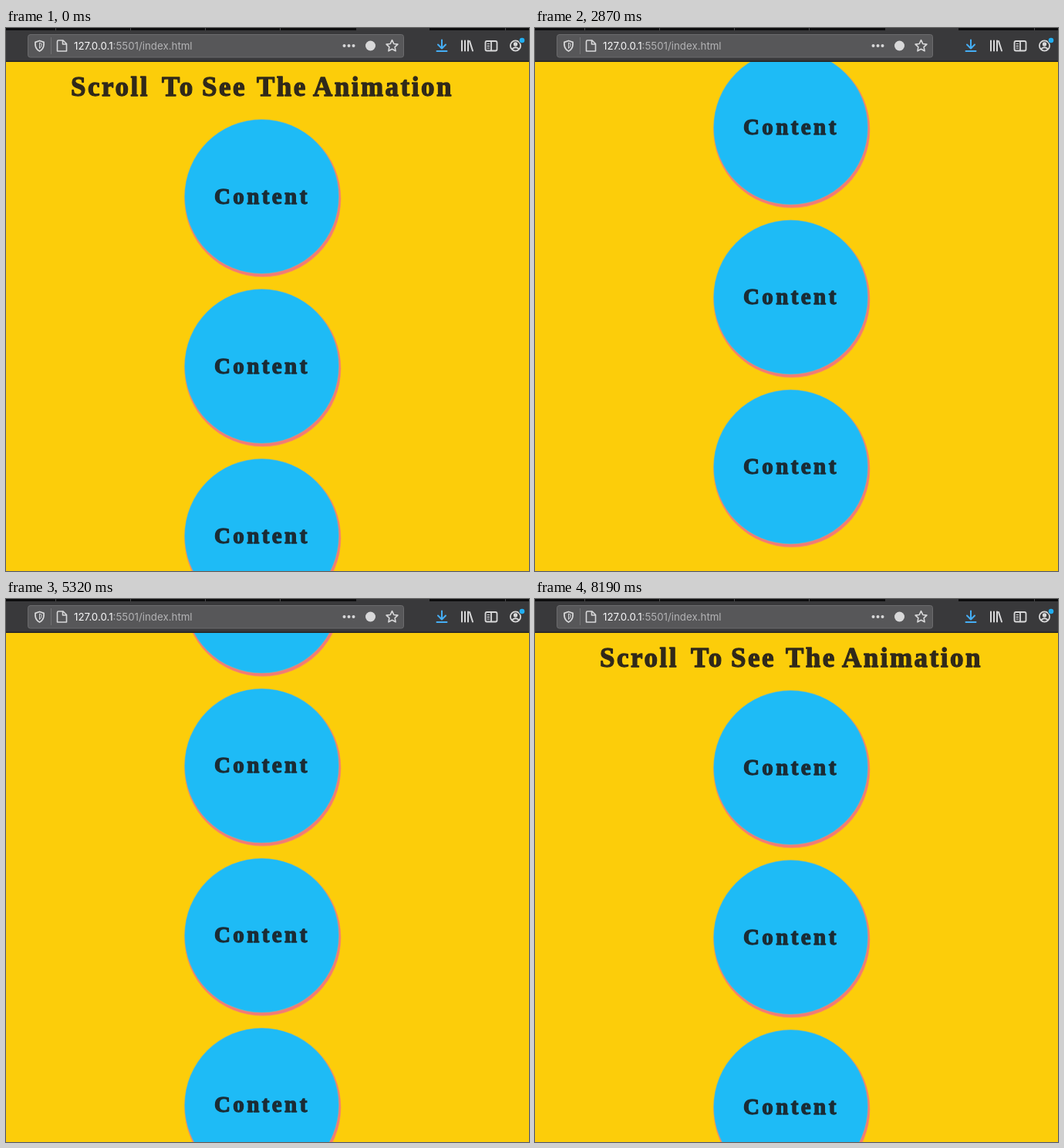
These frames come from a looping animation (678x704 px, 8.26 s). An HTML page with a canvas:

```html
<!DOCTYPE html>
<html lang="en">
<head>
<meta charset="utf-8">
<title>Scroll Animation</title>
<style>
  html, body { margin: 0; width: 100%; height: 100%; overflow: hidden; background: #fccd0a; }
  canvas { display: block; }
</style>
</head>
<body>
<canvas id="stage" width="678" height="704"></canvas>
<script>
const ctx = document.getElementById('stage').getContext('2d');
const W = 678, H = 704, LOOP = 8260, STEP = 70;
const BAR = 44, CX = 331.5, FIRST = 218.5, PITCH = 220, R = 100;
const BOXES = 12, TRIGGER = 667, SLIDE = 400, FAR = 800;
const SERIF = '"Liberation Serif", "Noto Serif", serif';

// Scroll position over time: [ms, px]
const KEYS = [
  [0, 0], [750, 0], [880, 113], [1120, 333], [1400, 480], [1700, 560],
  [2000, 790], [2400, 1000], [2870, 1189.5], [3150, 1440], [3500, 1660],
  [3968, 1873], [4090, 1925], [5020, 1925], [5400, 1700], [5700, 1410],
  [5880, 1339], [6300, 1260], [6500, 1205], [6790, 1101.5], [7100, 700],
  [7400, 190], [7580, 0], [LOOP, 0]
];
const grade = KEYS.slice(1).map((k, i) => (k[1] - KEYS[i][1]) / (k[0] - KEYS[i][0]));
const slope = KEYS.map((k, i) => {
  const a = grade[i - 1] || 0, b = grade[i] || 0;
  return a * b > 0 ? 2 * a * b / (a + b) : 0;
});

function scrollAt(t) {
  let i = 0;
  while (i < KEYS.length - 2 && t >= KEYS[i + 1][0]) i++;
  const [t0, y0] = KEYS[i], [t1, y1] = KEYS[i + 1];
  const d = t1 - t0, u = (t - t0) / d, v = 1 - u;
  return y0 * (1 + 2 * u) * v * v + slope[i] * d * u * v * v
       + y1 * u * u * (3 - 2 * u) - slope[i + 1] * d * u * u * v;
}

// CSS "ease": cubic-bezier(.25, .1, .25, 1)
function ease(x) {
  if (x <= 0) return 0;
  if (x >= 1) return 1;
  let lo = 0, hi = 1, s = 0.5;
  for (let i = 0; i < 20; i++) {
    s = (lo + hi) / 2;
    const bx = 0.75 * s * (1 - s) + s * s * s;
    if (bx < x) lo = s; else hi = s;
  }
  return 0.3 * s * (1 - s) * (1 - s) + 3 * s * s * (1 - s) + s * s * s;
}

// When each box enters and leaves the trigger zone
const boxes = Array.from({ length: BOXES }, (_, i) => {
  const need = FIRST - R + PITCH * i - TRIGGER;
  if (need < 0) return { enter: -SLIDE, leave: LOOP };
  let enter = 0, leave = LOOP;
  while (scrollAt(enter) < need) enter += 5;
  while (scrollAt(leave) < need) leave -= 5;
  return { enter, leave };
});

function disc(x, y, r, fill) {
  ctx.beginPath();
  ctx.arc(x, y, r, 0, 7);
  ctx.fillStyle = fill;
  ctx.fill();
}

function rect(x, y, w, h, fill) {
  ctx.fillStyle = fill;
  ctx.fillRect(x, y, w, h);
}

function line(path, color = '#d8d8d9', width = 1.8) {
  ctx.strokeStyle = color;
  ctx.lineWidth = width;
  ctx.stroke(new Path2D(path));
}

function fatText(text, x, y, size, gap, color) {
  ctx.font = `bold ${size}px ${SERIF}`;
  ctx.letterSpacing = gap + 'px';
  ctx.fillStyle = ctx.strokeStyle = color;
  ctx.lineWidth = 1.3;
  ctx.fillText(text, x, y);
  ctx.strokeText(text, x, y);
  ctx.letterSpacing = '0px';
}

function drawBox(x, y) {
  disc(x + 1.3, y + 3, 101.6, '#fb9f48');
  disc(x + 1.2, y + 2.7, 101, '#f27b75');
  disc(x, y, 100.2, '#73b9b5');
  disc(x, y, 99.5, '#1ebbf6');
  fatText('Content', x - 61.5, y + 9, 29, 3.4, '#1b2c35');
}

function drawPage(t) {
  const s = scrollAt(t);
  rect(0, BAR, W, H - BAR, '#fccd0a');
  const title = [['Scroll', 84], ['To', 202], ['See', 254], ['The', 325], ['Animation', 398]];
  if (s < 60) title.forEach(([word, x]) => fatText(word, x, 88 - s, 35, 2.5, '#30291a'));
  boxes.forEach((b, i) => {
    const y = FIRST + PITCH * i - s;
    if (y < BAR - 110 || y > H + 110) return;
    const shown = ease((t - b.enter) / SLIDE) - ease((t - b.leave) / SLIDE);
    const side = i % 2 ? -1 : 1;
    drawBox(CX + side * FAR * (1 - shown), y);
  });
}

function drawBar() {
  rect(0, 0, W, BAR, '#39393b');
  rect(0, 0, W, 3, '#0d0d0e');
  [64, 161, 258, 355, 647].forEach(x => rect(x, 0, 1, 3, '#4a4a4c'));
  rect(454, 0, 95, 3, '#39393b');
  rect(0, 42.5, W, 1.5, '#252524');

  ctx.beginPath();
  ctx.roundRect(28.5, 8.5, 487, 29.5, 3);
  ctx.fillStyle = '#575759';
  ctx.fill();
  ctx.strokeStyle = '#6b6b6d';
  ctx.lineWidth = 1;
  ctx.stroke();
  rect(58, 12, 1, 22, '#717173');

  ctx.font = '13.3px Inter, Roboto, sans-serif';
  ctx.fillStyle = '#f7f7f8';
  ctx.fillText('127.0.0.1', 88, 28);
  ctx.fillStyle = '#b3b3b5';
  ctx.fillText(':5501/index.html', 88 + ctx.measureText('127.0.0.1').width, 28);

  ctx.lineCap = ctx.lineJoin = 'round';
  // shield, page
  line('M43.5 16.5 L49 18.3 V22 Q48.500 27.500 43.500 30 Q38.500 27.500 38 22 V18.300 Z');
  line('M43.500 19.500 V26.500 Q46.200 24.500 46.200 21 Z', '#d8d8d9', 1);
  line('M68 16 H74 L78.500 20.500 V30 H66.500 V17.500 Q66.500 16 68 16 M73.500 16.500 V21 H78', '#d8d8d9', 1.6);
  // menu dots, saved item, star
  [438.5, 444.5, 450.5].forEach(x => disc(x, 23, 2, '#d8d8d9'));
  disc(472.5, 23, 6.5, '#d8d8d9');
  let star = '';
  for (let i = 0; i < 10; i++) {
    const a = Math.PI * (i / 5 - 0.5), r = i % 2 ? 3.8 : 7.8;
    star += `${i ? 'L' : 'M'}${500.5 + r * Math.cos(a)} ${23.5 + r * Math.sin(a)}`;
  }
  line(star + 'Z', '#d8d8d9', 1.6);
  // download, library, sidebar
  line('M565 15.500 V26 M560 21.500 L565 26.500 L570 21.500 M558.500 30 H571.500', '#45aef5', 2);
  line('M591 16.500 V29.500 M595 16.500 V29.500 M599 16.500 V29.500 M601 17 L605 29.500', '#d8d8d9', 2);
  line('M623.500 17 H634.500 Q636.500 17 636.500 19 V27.500 Q636.500 29.500 634.500 29.500 H623.500 Q621.500 29.500 621.500 27.500 V19 Q621.500 17 623.500 17 M629 17 V29.500');
  line('M624 20.500 H626.500 M624 23.300 H626.500 M624 26 H626.500', '#d8d8d9', 1.2);
  // account
  ctx.beginPath();
  ctx.arc(660.5, 23, 6.6, 0, 7);
  ctx.strokeStyle = '#d8d8d9';
  ctx.lineWidth = 1.8;
  ctx.stroke();
  disc(660.5, 21, 2.7, '#d8d8d9');
  line('M656.500 27 Q660.500 23.500 664.500 27', '#d8d8d9', 2);
  disc(669, 16, 4.3, '#39393b');
  disc(669, 16, 3.3, '#22aef0');
}

const start = performance.now();
function frame(now) {
  const t = Math.floor((Math.max(0, now - start) % LOOP) / STEP) * STEP;
  drawPage(t);
  drawBar();
  requestAnimationFrame(frame);
}
frame(start);
</script>
</body>
</html>
```
